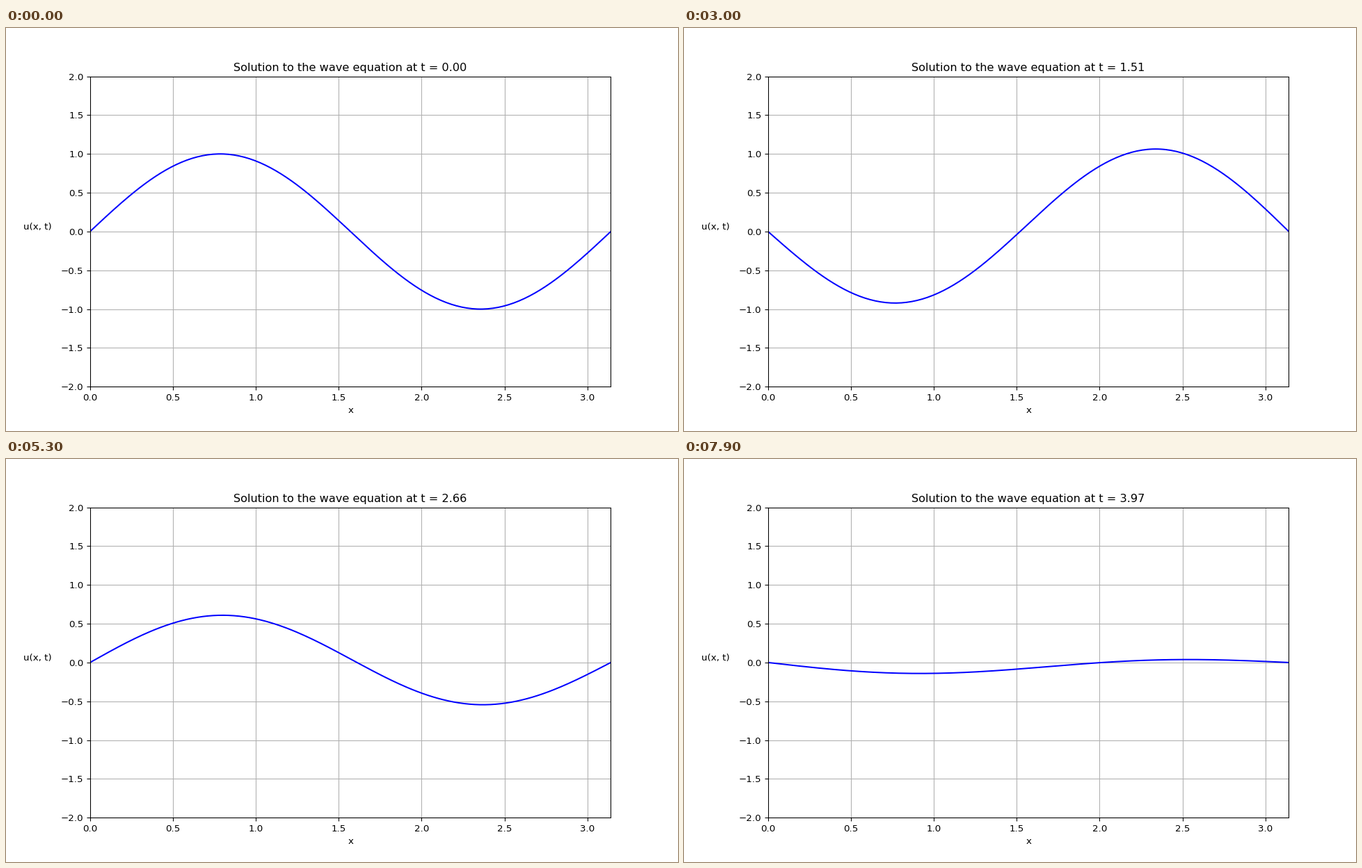
Animation of 966x580 px, one loop 8 s. Source, as a matplotlib script:

```python
import numpy as np
import matplotlib.pyplot as plt
from matplotlib.animation import FuncAnimation

W, H, DPI = 966, 580, 96.6
FRAMES, INTERVAL = 80, 100

plt.rcParams["font.family"] = "DejaVu Sans"

x = np.linspace(0, np.pi, 200)
times = np.linspace(0, 10, 200)


def u(x, t):
    """Two standing modes on a string with fixed ends."""
    return np.cos(2 * t) * np.sin(2 * x) + 0.1 * np.sin(t) * np.sin(x)


# The small margin keeps the pixel size from being truncated by one.
fig, ax = plt.subplots(figsize=((W + 0.01) / DPI, (H + 0.01) / DPI), dpi=DPI)
line, = ax.plot(x, u(x, 0), color="blue", lw=1.5)
ax.set_xlim(0, np.pi)
ax.set_ylim(-2, 2)
ax.set_xlabel("x")
ax.set_ylabel("u(x, t)", rotation=0, labelpad=25)
title = ax.set_title("")
ax.grid(True)


def update(i):
    t = times[i]
    line.set_ydata(u(x, t))
    title.set_text(f"Solution to the wave equation at t = {t:.2f}")
    return line, title


anim = FuncAnimation(fig, update, frames=FRAMES, interval=INTERVAL,
                     repeat=True, repeat_delay=0, blit=False)
plt.show()
```
